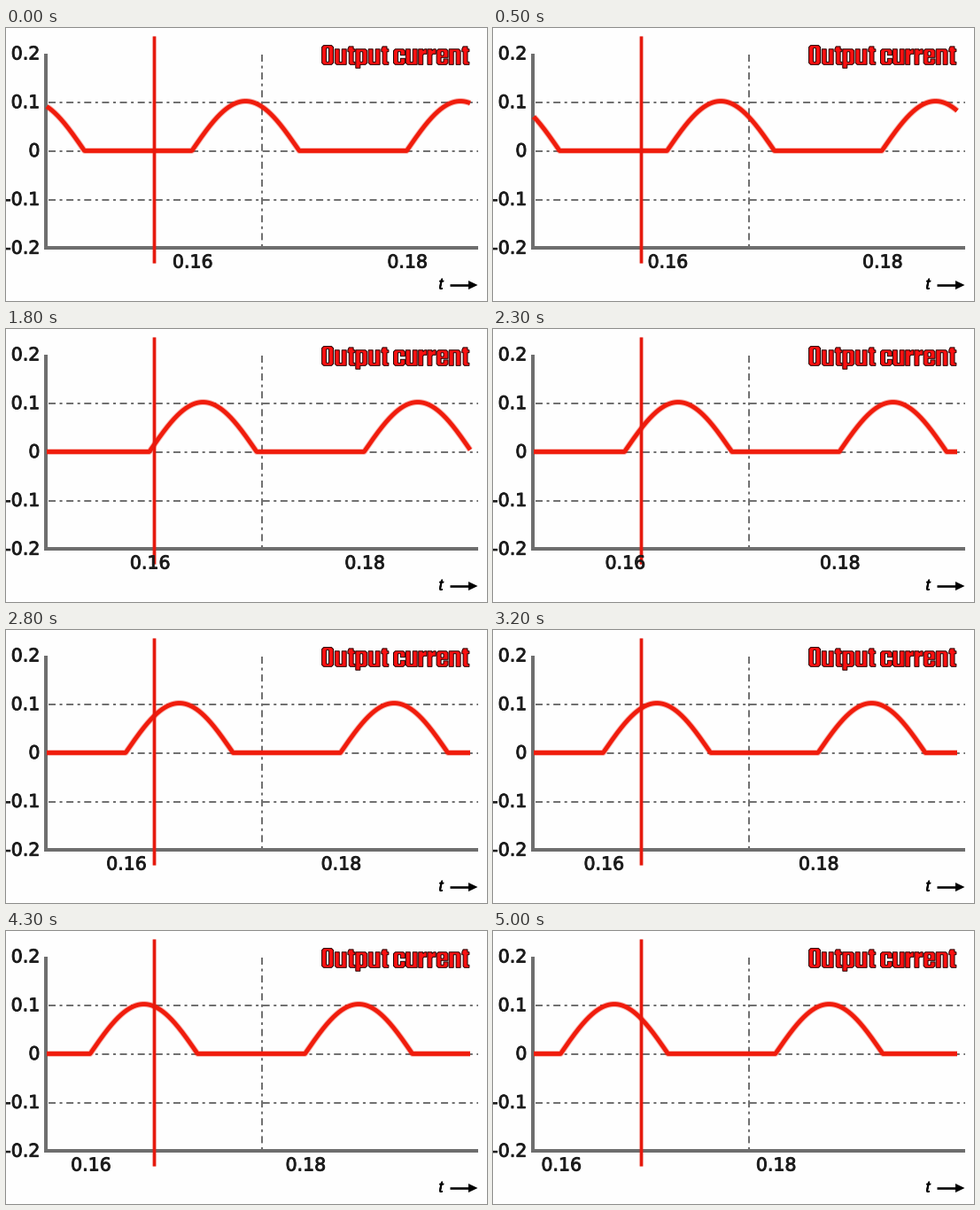
A matplotlib script for the animation above (5.1 s loop, 543 px wide and 308 px high).

```python
import numpy as np
import matplotlib.pyplot as plt
from matplotlib.animation import FuncAnimation
from matplotlib.patches import Polygon
from matplotlib.patheffects import withStroke

W, H, DPI = 543, 308, 72          # at 72 dpi one point is one pixel
FRAMES, INTERVAL = 51, 100
RED, CURSOR_RED, TITLE_RED = "#f01c0c", "#e61a0e", "#fa1010"
GRAY, GRID, INK, PAPER = "#6e6e6e", "#6a6a6a", "#1c1c1c", "#fefefe"
LEFT, RIGHT = 46, 524             # visible span of the wave
ZERO_Y, AMP = 138.5, 56
PERIOD = 242.5
START, SPEED = 209.8, 2.67        # where the first hump rises, px per frame

fig = plt.figure(figsize=(W / DPI, H / DPI), dpi=DPI, facecolor=PAPER)
ax = fig.add_axes([0, 0, 1, 1])
ax.set_xlim(0, W)
ax.set_ylim(H, 0)
ax.axis("off")


def line(xs, ys, color, width, z, **kw):
    return ax.plot(xs, ys, color=color, lw=width, zorder=z,
                   solid_capstyle="butt", solid_joinstyle="round", **kw)[0]


def soft_line(xs, ys, color, width, z):
    """A line with a faint soft edge."""
    return [line(xs, ys, color, width + 2, z, alpha=0.3),
            line(xs, ys, color, width, z)]


def label(x, y, text, ha):
    """Chart number, a little heavier than regular weight."""
    return ax.text(x, y, text, ha=ha, va="baseline", family="DejaVu Sans",
                   size=20.5, color=INK, zorder=6,
                   path_effects=[withStroke(linewidth=0.9, foreground=INK)])


# Grid and axes
dashes = (0, (4.2, 2.4, 1.6, 2.4))
for y in (83.5, 138.5, 193.5):
    line([48, 533], [y, y], GRID, 1.9, 1, linestyle=dashes)
line([289, 289], [30, 246], GRID, 1.9, 1, linestyle=dashes)
line([45, 45], [29, 249.5], GRAY, 4, 2)
line([43, 533], [247.5, 247.5], GRAY, 4, 2)

for i, text in enumerate(("0.2", "0.1", "0", "-0.1", "-0.2")):
    label(38.5, 35.5 + 54.8 * i, text, "right")

# Time arrow
ax.text(491, 294.5, "t", ha="center", va="baseline", size=18, color="black",
        family="Liberation Sans", style="italic",
        path_effects=[withStroke(linewidth=0.7, foreground="black")])
line([501, 524], [290, 290], "black", 2.6, 3)
ax.add_patch(Polygon([(522, 285), (532.5, 290), (522, 295)],
                     color="black", lw=0, zorder=3))

# Title lettering: condensed heavy outlines, baseline at y = 0, upwards
CAP, XH = 21.7, 17.5              # cap height and x-height
B = 12.9                          # letter width
A, C = 5, 7.9                     # counter, left and right side
LO, HI = 3, 14.6                  # counter, bottom and top


def block(x0, y0, x1, y1, cut):
    """Rectangle with cut corners, clockwise from the upper right."""
    return [(x1, y1 - cut), (x1 - cut, y1), (x0 + cut, y1), (x0, y1 - cut),
            (x0, y0 + cut), (x0 + cut, y0), (x1 - cut, y0), (x1, y0 + cut)]


bowl = block(0, 0, B, XH, 1.9)
n = [(0, 0), (0, XH), (B - 1.9, XH), (B, XH - 1.9), (B, 0),
     (C, 0), (C, HI), (A, HI), (A, 0)]
u = [(B - x, XH - y) for x, y in n]
p = [(A, -3.9), (0, -3.9), (0, XH)] + bowl[1::-1] + bowl[:5:-1] + [(A, 0)]
c = bowl + [(B, 7), (C, 7), (C, LO), (A, LO), (A, HI), (C, HI),
            (C, 10.6), (B, 10.6)]
e = bowl + [(B, 6.4), (C, 6.4), (C, LO), (A, LO), (A, 8), (B, 8)]
r = [(0, 0), (0, XH), (A, XH), (A, 15.8), (7, XH), (9.3, XH),
     (9.3, 12), (6.2, 12), (A, 10.8), (A, 0)]
t = [(1.5, 20.4), (6.4, 20.4), (6.4, XH), (8.3, XH), (8.3, HI), (6.4, HI),
     (6.4, LO), (8.3, LO), (8.3, 0), (3, 0), (1.5, 1.5), (1.5, HI),
     (0.2, HI), (0.2, XH)]
GLYPHS = {  # advance, outline, counter
    "O": (14.7, block(0, 0, B, CAP, 2), block(A, LO, C, CAP - LO, 0.6)),
    "u": (14.4, u, None),
    "t": (9.1, t, None),
    "p": (14.4, p, block(A, LO, C, HI, 0.6)),
    "c": (13.8, c, None),
    "r": (10.2, r, None),
    "e": (14.1, e, block(A, 10.2, C, HI, 0.6)),
    "n": (14.4, n, None),
    " ": (4.8, None, None),
}


def draw_title(text, x, base):
    for ch in text:
        advance, outline, counter = GLYPHS[ch]
        for shape, color, z in ((outline, TITLE_RED, 8), (counter, PAPER, 9)):
            if shape:
                ax.add_patch(Polygon([(x + dx, base - dy) for dx, dy in shape],
                                     fc=color, ec="#200000", lw=1, zorder=z))
        x += advance


draw_title("Output current", 356.6, 41.3)

# Moving parts
xs = np.linspace(LEFT, RIGHT, 960)
wave = soft_line(xs, xs * 0, RED, 4.9, 4)
soft_line([167.2, 167.2], [9, 265], CURSOR_RED, 3.2, 5)
ticks = [label(0, 270.5, text, "center") for text in ("0.16", "0.18")]


def update(frame):
    rise = START - SPEED * frame
    swing = np.sin(2 * np.pi * (xs - rise) / PERIOD)
    for part in wave:
        part.set_ydata(ZERO_Y - AMP * np.maximum(swing, 0))
    for i, tick in enumerate(ticks):
        tick.set_x(rise + 1 + PERIOD * i)
    return wave + ticks


anim = FuncAnimation(fig, update, frames=FRAMES, interval=INTERVAL,
                     repeat=True, repeat_delay=0, blit=False)
plt.show()
```
